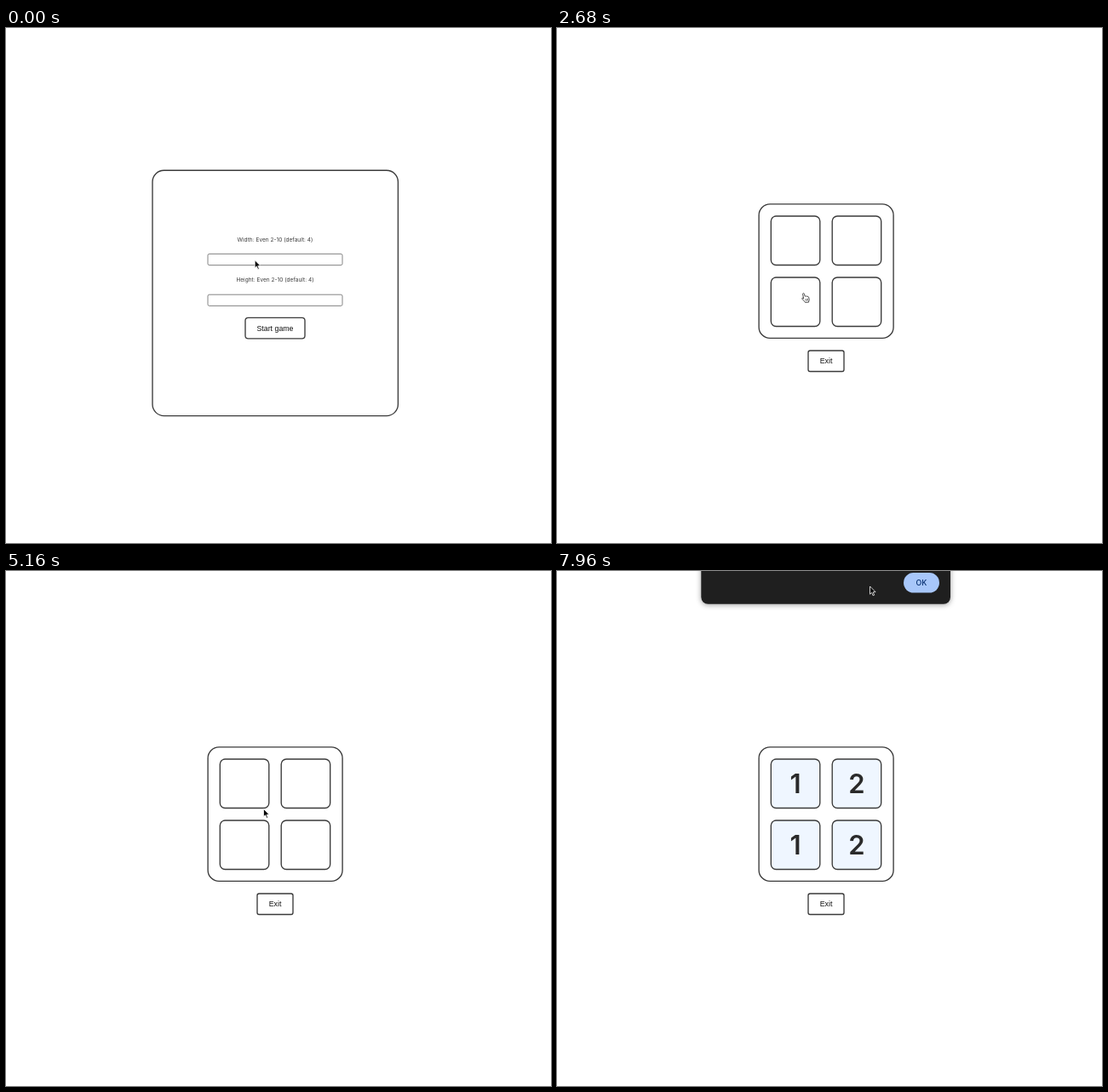
An HTML page for the animation above (8000 ms loop, 640 by 605 pixels).

```html
<!DOCTYPE html>
<html lang="en">
<head>
<meta charset="utf-8">
<title>Memory game</title>
<style>
html, body { margin: 0; width: 100%; height: 100%; overflow: hidden; background: #fff; }
svg { display: block; width: 640px; height: 605px; }
.line { fill: #fff; stroke: #3a3a3a; stroke-width: 1.35; }
.field { fill: #fff; stroke: #767676; stroke-width: .9; }
.label { font: 6.5px Inter, sans-serif; letter-spacing: .03px; fill: #3a3a3a; text-anchor: middle; }
.ui { font: 8.8px "Liberation Sans", Arial, sans-serif; fill: #111; }
.mid { text-anchor: middle; }
.digit { font: 600 31px Inter, sans-serif; fill: #2a2a2a; text-anchor: middle; }
</style>
</head>
<body>
<svg viewBox="0 0 640 605">
  <g id="setup">
    <rect class="line" x="172" y="167.2" width="288.4" height="288.4" rx="13.5"/>
    <text class="label" x="316" y="250.6">Width: Even 2-10 (default: 4)</text>
    <text class="label" x="316" y="298.3">Height: Even 2-10 (default: 4)</text>
    <rect class="field" id="field0" x="237" y="265.4" width="158" height="13.2" rx="1.8"/>
    <rect class="field" id="field1" x="237" y="313.2" width="158" height="13.2" rx="1.8"/>
    <text class="ui" id="value0" x="239.2" y="275.1">2</text>
    <text class="ui" id="value1" x="239.2" y="322.8">2</text>
    <path id="caret" stroke="#111" stroke-width=".7"/>
    <rect class="line" id="start" x="281" y="340.3" width="70" height="24.6" rx="3.4"/>
    <text class="ui mid" id="startText" x="316" y="355.6">Start game</text>
  </g>
  <g id="game">
    <rect class="line" x="237.1" y="206.9" width="158" height="157.5" rx="13"/>
    <g id="cards"></g>
    <rect class="line" x="295" y="379" width="42" height="24.5" rx="2.2"/>
    <text class="ui mid" x="316" y="394.2">Exit</text>
  </g>
  <g id="dialog">
    <rect x="169.3" y="-60" width="292.7" height="98.8" rx="8" fill="#1f1f1f" style="filter: drop-shadow(0 1.5px 3px rgba(0,0,0,.4))"/>
    <rect x="407" y="2" width="42" height="23.6" rx="11.8" fill="#a8c7fa"/>
    <text x="427.8" y="17" class="mid" fill="#062e6f" style="font: 500 8.8px Inter, sans-serif">OK</text>
  </g>
  <path id="arrow" d="M0 0V9.2L2.1 7.3L3.6 10.8L5.1 10.2L3.6 6.8L6.5 6.6Z" fill="#000" stroke="#fff" stroke-width=".8" stroke-linejoin="round"/>
  <g id="hand" stroke="#222" stroke-width=".8" stroke-linejoin="round" stroke-linecap="round">
    <path fill="#fff" d="M2.5 6.4L1.6 1.7Q1.6.6 2.5.6Q3.3.7 3.5 1.6L4.2 4.2Q4.9 3.6 5.5 4.2Q6.4 3.6 7 4.5Q8 4.1 8.5 5.1L9.2 7.6Q9.4 9 8.6 10V11.1L4.5 11.4Q3.7 9.6 1.2 7.8Q.2 6.8 1 6.2Q1.7 5.9 2.5 6.4Z"/>
    <path fill="none" stroke-width=".55" d="M4.8 7.5L5.1 9.3M6.2 7.3L6.4 9.2M7.5 7.1L7.7 9"/>
  </g>
</svg>
<script>
const LOOP = 8000, STEP = 40;
const $ = id => document.getElementById(id);
const show = (el, on) => el.style.display = on ? "" : "none";

// [time, x, y] of the pointer tip
const path = [
  [0, 292.2, 272.7], [160, 292.2, 272.7], [200, 290, 273.2], [1000, 290, 273.2],
  [1240, 296, 314.5], [1640, 296, 314.5], [1960, 304.6, 355.5], [2400, 304.6, 355.5],
  [2680, 289.6, 311.5], [2960, 289.6, 311.5], [3200, 350.6, 248.5], [3400, 350.6, 248.5],
  [3560, 360.6, 261.5], [3680, 367.5, 276], [3920, 330, 316], [4200, 281.6, 328.5],
  [4400, 281.6, 328.5], [4640, 345.6, 328.5], [4920, 345.6, 328.5], [5080, 318, 273],
  [5280, 283, 303], [5560, 273, 323.5], [5680, 273, 323.5], [6000, 283.6, 262.5],
  [6400, 283.6, 262.5], [6600, 346, 252], [6740, 346, 252], [7000, 344, 335],
  [7120, 344, 335], [7240, 344.4, 349], [7320, 346, 371], [7400, 346, 371],
  [7920, 362, 29.5], [7960, 367.5, 18], [8000, 367.5, 18]
];

// [time, digit strength] pairs; "done" is when the card is matched
const cards = [
  { x: 251.3, y: 221, n: 1, done: 6450, keys: [[6200, 0], [6450, 1]] },
  { x: 323.2, y: 221, n: 2, done: 7200,
    keys: [[3400, 0], [3480, .46], [3560, .16], [3600, 0], [6640, 0], [6890, 1]] },
  { x: 251.3, y: 293, n: 1, done: 6450,
    keys: [[2880, 0], [3130, 1], [3480, 1], [3700, 0], [4360, 0], [4610, 1],
           [4920, 1], [5140, 0], [5300, 0], [5550, 1]] },
  { x: 323.2, y: 293, n: 2, done: 7200,
    keys: [[4840, 0], [4920, .46], [5000, .16], [5040, 0], [7120, 0], [7370, 1]] }
];

function add(name, attrs) {
  const el = document.createElementNS("http://www.w3.org/2000/svg", name);
  for (const key in attrs) el.setAttribute(key, attrs[key]);
  return $("cards").appendChild(el);
}

for (const c of cards) {
  c.box = add("rect", { class: "line", x: c.x, y: c.y, width: 57.5, height: 57.5, rx: 6 });
  c.text = add("text", { class: "digit", x: c.x + 28.8, y: c.y + 40.4 });
  c.text.textContent = c.n;
}

function segment(keys, t) {
  let i = 0;
  while (i < keys.length - 2 && keys[i + 1][0] <= t) i++;
  const [a, b] = [keys[i], keys[i + 1]];
  return { i, a, b, u: Math.min(1, Math.max(0, (t - a[0]) / (b[0] - a[0]))) };
}

const still = (a, b) => !a || !b || (a[1] === b[1] && a[2] === b[2]);

function slope(i, axis) {
  const [p, q, r] = [path[i - 1], path[i], path[i + 1]];
  return still(p, q) || still(q, r) ? 0 : (r[axis] - p[axis]) / (r[0] - p[0]);
}

// smooth curve through the path, at rest where it pauses
function pointer(t) {
  const { i, a, b, u } = segment(path, t), d = b[0] - a[0], v = 1 - u;
  return [1, 2].map(k => a[k] * v * v * (1 + 2 * u) + b[k] * u * u * (3 - 2 * u) +
    d * u * v * (v * slope(i, k) - u * slope(i + 1, k)));
}

const inside = (x, y, l, t, w, h) => x > l && x < l + w && y > t && y < t + h;
const mix = (from, to, k) => Math.round(from + (to - from) * k);

function drawSetup(t, hover) {
  const focus = t < 720 ? -1 : t < 1280 ? 0 : t < 2000 ? 1 : -1;
  const typed = [t >= 880, t >= 1480];
  typed.forEach((on, i) => {
    show($("value" + i), on);
    $("field" + i).style.stroke = focus === i ? "#005fcc" : "";
  });
  show($("caret"), focus >= 0);
  if (focus >= 0) $("caret").setAttribute("d", `M${typed[focus] ? 244.6 : 239.4} ${focus ? 315.4 : 267.6}v8.8`);
  $("start").style.fill = $("start").style.stroke = hover ? "#555" : "";
  $("startText").style.fill = hover ? "#fff" : "";
}

function drawCard(c, t) {
  const { a, b, u } = segment(c.keys, t);
  const level = a[1] + (b[1] - a[1]) * u;
  // the tint fades in, but drops at once when the card is hidden
  const tint = b[1] < a[1] ? 0 : level;
  c.text.style.opacity = level;
  c.box.style.fill = `rgb(${mix(255, 239, tint)},${mix(255, 246, tint)},255)`;
}

function draw(t) {
  const [x, y] = pointer(t), playing = t >= 2120;
  const onStart = inside(x, y, 281, 340, 70, 25);
  const onCard = cards.some(c => t < c.done && inside(x, y, c.x, c.y, 57.5, 57.5));
  const hand = t < 2160 ? onStart : onCard;

  show($("setup"), !playing);
  show($("game"), playing);
  if (playing) cards.forEach(c => drawCard(c, t));
  else drawSetup(t, onStart);

  $("dialog").style.opacity = Math.min(1, Math.max(0, (t - 7440) / 120));
  show($("arrow"), !hand);
  show($("hand"), hand);
  $("arrow").setAttribute("transform", `translate(${x} ${y})`);
  $("hand").setAttribute("transform", `translate(${x - 2.6} ${y - .5})`);
}

const begin = performance.now();
function frame() {
  const t = (performance.now() - begin) % LOOP;
  draw(Math.floor(t / STEP) * STEP);
  requestAnimationFrame(frame);
}
frame();
</script>
</body>
</html>
```
